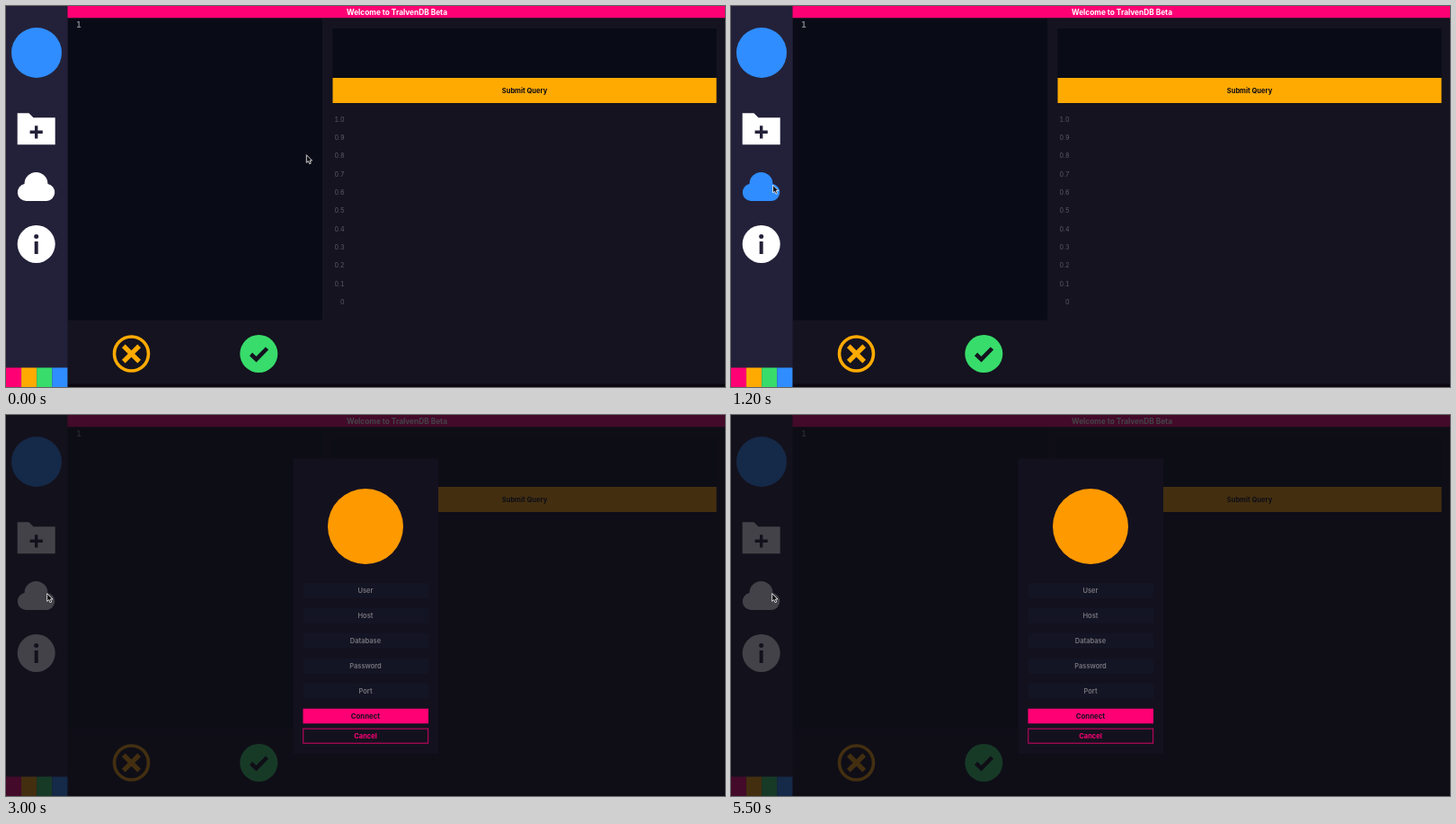
Recreate the animation shown at these times as an HTML page. Size 800 by 424 pixels, loop 5600 ms.

```html
<!DOCTYPE html>
<html lang="en">
<head>
<meta charset="utf-8">
<title>Query workspace</title>
<style>
  html, body { margin: 0; width: 100%; height: 100%; overflow: hidden; background: #14131f; }
  svg { display: block; width: 800px; height: 424px; }
  text { font: 700 7.5px Inter, sans-serif; text-anchor: middle; }
  .axis text { font-size: 7px; font-weight: 400; font-variant-numeric: tabular-nums; text-anchor: end; fill: #5d5c66; }
  .fields rect { fill: #131524; }
  .fields text { fill: #77767d; font-weight: 600; }
</style>
</head>
<body>
<svg viewBox="0 0 800 424">
  <rect width="800" height="424" fill="#14131f"/>
  <rect y="420.5" width="800" height="3.5" fill="#0c0812"/>

  <rect width="68.5" height="424" fill="#232139"/>
  <circle cx="34" cy="52" r="28" fill="#2f8dff"/>
  <g fill="#fff">
    <path d="M12.7 119.3H25.5L30.5 124.2H54.7V154.3H12.7Z"/>
    <path id="cloud" d="M22.5 217A9.6 9.6 0 0 1 20.5 198A13 13 0 0 1 46.5 198A9.6 9.6 0 0 1 45.2 217Z"/>
    <circle cx="33.7" cy="265" r="21"/>
  </g>
  <path d="M26.6 140.3H40.8M33.7 133.2V147.4" stroke="#232139" stroke-width="3.4"/>
  <path d="M33.7 262V276" stroke="#232139" stroke-width="4"/>
  <circle cx="33.7" cy="256.5" r="2.5" fill="#232139"/>
  <g id="stripes"></g>

  <rect x="68.5" width="731.5" height="13.2" fill="#ff0074"/>
  <text x="435" y="9.6" fill="#fff" style="font-size:8.3px">Welcome to TralvenDB Beta</text>

  <rect x="69" y="14" width="283" height="335.5" fill="#090c17"/>
  <text x="81" y="24.3" fill="#85868c" style="font:700 9px 'DejaVu Sans Mono',monospace">1</text>
  <rect x="363.5" y="25" width="427" height="55" fill="#090c17"/>
  <rect x="363.5" y="80" width="427" height="28" fill="#ffaa00"/>
  <text x="577" y="96.8" fill="#0c0b15">Submit Query</text>
  <g id="axis" class="axis"></g>

  <circle cx="139.5" cy="387" r="19" fill="none" stroke="#ffaa00" stroke-width="3.6"/>
  <path d="M130.8 378.3L148.2 395.7M148.2 378.3L130.8 395.7" stroke="#ffaa00" stroke-width="5.2"/>
  <circle cx="281.3" cy="387" r="21" fill="#38dc6b"/>
  <path d="M272.5 387.5L278.5 393.2L290.5 381" fill="none" stroke="#14131f" stroke-width="4.6"/>

  <g id="modal">
    <rect width="800" height="424" fill="#0f0e15" fill-opacity=".78"/>
    <rect x="319.5" y="48.5" width="161.5" height="328.5" fill="#14111f"/>
    <circle cx="400" cy="124" r="42" fill="#ff9900"/>
    <g id="fields" class="fields"></g>
    <rect x="330.5" y="326.8" width="139.5" height="16.5" fill="#ff0074"/>
    <text x="400" y="337.8" fill="#14111f" style="font-size:7.8px">Connect</text>
    <rect x="330.8" y="349.1" width="138.9" height="16.1" fill="none" stroke="#ff0074" stroke-width=".8"/>
    <text x="400" y="359.8" fill="#ff0074">Cancel</text>
  </g>

  <path id="cursor" d="M0 0V8.6L2 6.9L3.4 10L5 9.3L3.7 6.3H6.3Z" fill="#0b0b10" stroke="#fff" stroke-width=".8"/>
</svg>
<script>
  const LOOP = 5600, STEP = 100, ARRIVE = 700, HOVER = 800, SETTLE = 1700, OPEN = 2100;
  const $ = id => document.getElementById(id);

  $('stripes').innerHTML = ['#ff0074', '#ffaa00', '#38dc6b', '#2f8dff'].map((color, i) =>
    `<rect x="${i * 17.1}" y="402.5" width="17.1" height="21.5" fill="${color}"/>`).join('');

  $('axis').innerHTML = Array.from({ length: 11 }, (_, i) =>
    `<text x="376.5" y="${128.5 + i * 20.36}">${i < 10 ? (1 - i / 10).toFixed(1) : 0}</text>`).join('');

  $('fields').innerHTML = ['User', 'Host', 'Database', 'Password', 'Port'].map((label, i) => {
    const y = 187 + i * 27.9;
    return `<rect x="330.5" y="${y}" width="139.5" height="17"/><text x="400" y="${y + 11.3}">${label}</text>`;
  }).join('');

  const clamp = v => Math.min(1, Math.max(0, v));
  const ease = v => v * v * (3 - 2 * v);

  function draw(now) {
    const t = Math.floor(now % LOOP / STEP) * STEP;
    const travel = ease(clamp(t / ARRIVE));
    const settle = clamp((t - HOVER) / (SETTLE - HOVER));
    const x = 334.3 - 287 * travel - 1.6 * settle;
    const y = 165.7 + 34 * travel - settle;
    $('cursor').setAttribute('transform', `translate(${x} ${y})`);
    $('cloud').setAttribute('fill', t >= HOVER && t < OPEN ? '#2f8dff' : '#fff');
    $('modal').setAttribute('visibility', t >= OPEN ? 'visible' : 'hidden');
    requestAnimationFrame(draw);
  }
  requestAnimationFrame(draw);
</script>
</body>
</html>
```
